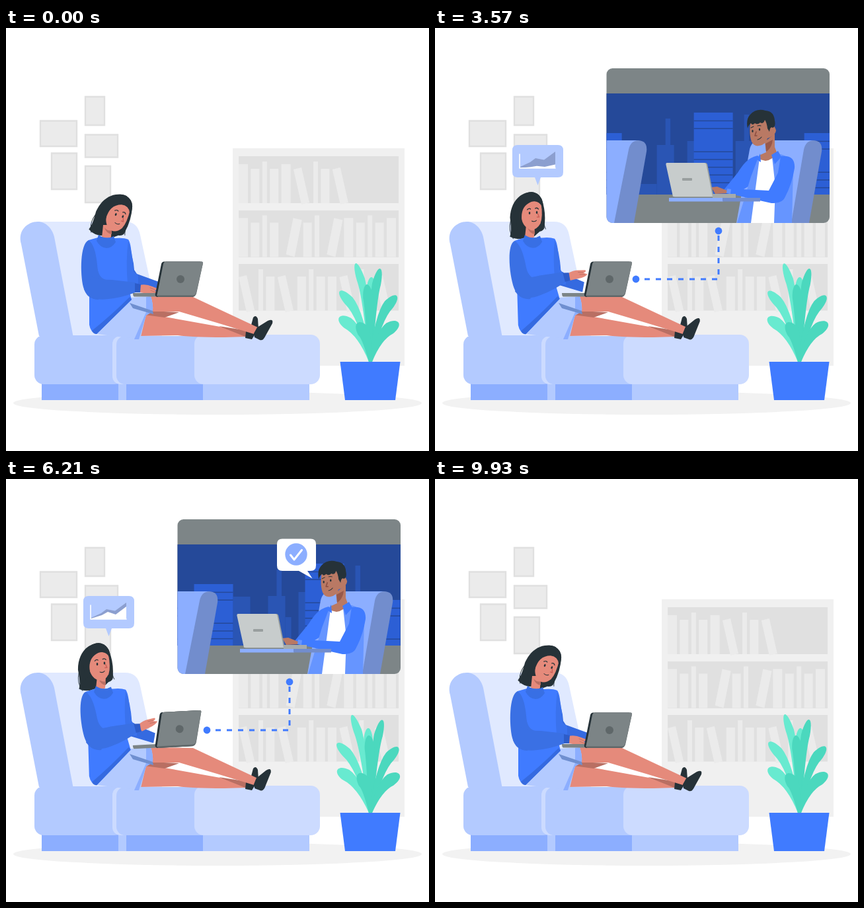
Write an HTML page that moves like this. It is 640 by 640 pixels and loops after 10000 ms.

```html
<!DOCTYPE html>
<html lang="en">
<head>
<meta charset="utf-8">
<title>Remote call</title>
<style>
html, body { margin: 0; width: 100%; height: 100%; overflow: hidden; background: #fff; }
svg { display: block; width: 100vw; height: 100vh; }
.line { fill: none; stroke-linecap: round; stroke-linejoin: round; }
</style>
</head>
<body>
<svg viewBox="0 0 640 640">
  <defs>
    <clipPath id="frame"><rect x="259.500" y="61" width="337.500" height="234" rx="9"/></clipPath>
    <clipPath id="window"><rect x="259" y="99" width="338" height="153"/></clipPath>
    <mask id="reveal" maskUnits="userSpaceOnUse" x="0" y="0" width="640" height="640">
      <path id="wipe" d="M304 380H429V307" pathLength="1" stroke-dasharray="1 2" fill="none" stroke="#fff" stroke-width="8"/>
    </mask>
  </defs>

  <!-- room -->
  <ellipse cx="320" cy="567.5" rx="309" ry="17.5" fill="#f2f2f2"/>
  <path d="M120 104h29v43h-29zM52 140.500h55v38.500h-55zM120 161.500h49v34h-49zM69 189.500h38v54.500h-38zM120 209h38v55h-38z" fill="#ebebeb" stroke="#e0e0e0" stroke-width="2.400"/>
  <path d="M343 182H603V511H343Z" fill="#f0f0f0"/>
  <path d="M352 194H594V265H352ZM352 276H594V347H352ZM352 357H594V427.500H352Z" fill="#e0e0e0"/>
  <g id="books" fill="#ebebeb"/>

  <!-- sofa -->
  <path d="M47 293H180Q199 293 203 313L236 466H95Z" fill="#e0e9ff"/>
  <path d="M50 466L23 327C17 306 33 293 48 293C60 293 70 303 73 316L101.500 466Z" fill="#b3caff"/>
  <path d="M54 535H170V563H54ZM182 535H298V563H182Z" fill="#8caeff"/>
  <path d="M170 535H182V563H170ZM298 535H459V563H298Z" fill="#b3caff"/>
  <rect x="43" y="465" width="135" height="74" rx="14" fill="#b3caff"/>
  <rect x="161" y="466" width="60" height="73" rx="12" fill="#ccdbff"/>
  <rect x="167" y="466" width="150" height="73" rx="13" fill="#b3caff"/>
  <rect x="285" y="464" width="190" height="75" rx="14" fill="#ccdbff"/>

  <!-- plant -->
  <g id="leafL" fill="#68ead0"/>
  <g id="leafD" fill="#4bd8be"/>
  <path d="M505.500 505H596.500L589 563H513Z" fill="#407bff"/>

  <!-- call link -->
  <path d="M304 380H429V307" fill="none" stroke="#407bff" stroke-width="3" stroke-dasharray="8 9" stroke-dashoffset="-13" mask="url(#reveal)"/>
  <circle id="dotA" cx="304" cy="380" r="5.400" fill="#407bff"/>
  <circle id="dotB" cx="429" cy="307" r="5.400" fill="#407bff"/>

  <!-- train scene -->
  <g id="panel"><g clip-path="url(#frame)">
    <path d="M259 61H597V295H259Z" fill="#7d8587"/>
    <path d="M259 99H597V252H259Z" fill="#254999"/>
    <g clip-path="url(#window)"><g id="city"/></g>
    <path d="M259 170H308L290 295H259Z" fill="#8caeff"/>
    <path d="M271 295L293 184Q296 170 308 170Q322 171 320 187L301 295Z" fill="#728dcd"/>
    <path d="M456 295L476 184Q479 170 492 170H572L556 295Z" fill="#8caeff"/>
    <path d="M539 295L558 184Q561 170 573 170Q587 171 585 187L566 295Z" fill="#728dcd"/>
    <path d="M488 193C472 197 466 207 458 219L436 246L452 253L482 235L494 198Z" fill="#407bff"/>
    <path d="M489 196L478 225L457 295H480L494 215ZM508 193L523 191Q544 197 542 213L540 295H511Z" fill="#6695ff"/>
    <path d="M491 197Q500 204 510 195L515 240L513 295H478L486 235Z" fill="#fff"/>
    <path d="M499 172L514 160L514 180L517 188Q511 200 500 201L492 199V192L501 188Z" fill="#b97964"/>
    <path d="M500 175L511 169Q510 181 501 187Z" fill="#97594b"/>
    <path d="M492 190L487 199L493 203ZM509 192L519 186L524 195L514 206Z" fill="#407bff"/>
    <path d="M523 194C538 192 545 198 544 212Q540 237 529 257Q525 265 509 265L442 250L447 243L505 246L519 219Z" fill="#407bff"/>
    <g id="manHead">
      <path d="M477 145Q475 162 479 172Q483 180 491 178Q501 176 503 167Q515 163 516 155Q514 147 510 148L507 138H480Z" fill="#b97964"/>
      <path d="M473 152Q470 138 477 131Q486 121 500 125Q513 126 514 140Q516 149 511 151Q507 148 506 157L503 152Q502 143 499 139Q497 146 492 143Q488 147 484 144Q480 148 478 144Q474 147 473 152Z" fill="#263238"/>
      <ellipse cx="480.500" cy="156" rx="1.200" ry="1.900" fill="#263238"/>
      <ellipse cx="491" cy="153.500" rx="1.200" ry="1.900" fill="#263238"/>
      <g class="line" stroke="#263238">
        <path d="M478 151l4-2M488 148q3-1 5 0M488 169q4-1 6-4"/>
        <path d="M486 157l-2 6h3" stroke="#8c4c40" stroke-width="1.500"/>
      </g>
    </g>
    <path d="M418 241L427 240L442 246V250L424 251Z" fill="#b97964"/>
    <path d="M442 243L448 244L447 251L441 250Z" fill="#6695ff"/>
    <path d="M352 204H409Q412 204 412.500 208L422 256H362Z" fill="#999f9f"/>
    <path d="M351 204H407Q410 204 410.500 207L420 255H360L349.500 207Q349 204 351 204Z" fill="#c7cccc"/>
    <rect x="374" y="227" width="15" height="4" rx="1" fill="#999f9f"/>
    <path d="M420 251H455V257H420Z" fill="#a6abab"/>
    <path d="M354 257H436V262.500H354Z" fill="#8caeff"/>
    <path d="M435 257H492V262.500H435Z" fill="#728dcd"/>
    <g id="reply">
      <path d="M418 90.500H461Q469 90.500 469 98.500V131Q469 139 461 139H456L463.500 150.500L443 139H418Q410 139 410 131V98.500Q410 90.500 418 90.500Z" fill="#fff"/>
      <circle cx="439" cy="114" r="16.700" fill="#8caeff"/>
      <path id="check" class="line" d="M430.500 115L436 122L447.500 107.500" pathLength="1" stroke-dasharray="1 2" stroke="#fff" stroke-width="3"/>
    </g>
  </g></g>

  <!-- woman -->
  <path d="M210 432L240 437L363 459L364 467L330 468Q280 468 260 465L202 466Z" fill="#e58a7b"/>
  <path d="M215 428L262 430L240 438L210 434ZM322 451L378 460L362 467Z" fill="#b96f63"/>
  <path d="M362 469L363 459L370 458Q371 447 374 438Q378 433 381 440L382 455L372 471Z" fill="#263238"/>
  <path d="M218 406L283 407L349 438L381 453L375 463Q320 446 262 429L222 429Z" fill="#e58a7b"/>
  <path id="shoe" d="M375 462L380 453L396 443Q405 439 403 447L393 465Q389 474 384 472L376 468Z" fill="#263238"/>
  <path d="M188 408L219 406Q223 418 222 428L212 434L203 471L137 463Z" fill="#b3caff"/>
  <path d="M212 407L219 406Q223 418 222 429L212 435L201 471H194L212 430Z" fill="#8caeff"/>
  <path d="M187 416L192 424L223 433L222 428Z" fill="#6f8fd0"/>

  <path class="head" d="M146 248C126 249 114 265 113 287Q116 308 113 316Q124 322 137 317H148L158 308Q167 306 165 297L163 268Q161 250 146 248Z" fill="#263238"/>
  <g id="neck">
    <path d="M138 298L151 298L150 316Q145 323 136 317Z" fill="#e58a7b"/>
    <path d="M140 302Q145 308 151 306V312Q143 311 140 302Z" fill="#b96f63"/>
  </g>
  <g id="body">
    <path id="farArm" d="M183 330Q193 345 194 366L198 372L231 384L229 399L190 389Q178 382 183 330Z" fill="#356ae0"/>
    <path d="M139 317L125 321Q116 340 126 400L126 449Q128 461 137 463L190 411L184 388L184 345L190 345Q189 325 185 320Q178 317 166 318Z" fill="#407bff"/>
    <path d="M185 322Q192 340 193 369L200 374V390L184 388Q181 350 185 322Z" fill="#3a72ed"/>
    <path d="M190 411L187 407Q160 434 130 458Q132 463 137 463Z" fill="#356ae0"/>
    <path d="M140 313Q152 321 163 315L166 324Q160 333 152 333Q142 332 137 322Z" fill="#386fe4"/>
    <g id="arm">
      <path d="M125 321C112 326 112 372 117 392Q122 411 140 411L152 381Q139 379 138 358Q135 328 125 321Z" fill="#3a70e4"/>
      <g id="forearm">
        <g id="hand">
          <path d="M202 389Q212 387 221 391L229 394Q231 397 225 397L230 401Q225 404 215 402L202 400Z" fill="#e58a7b"/>
          <path class="line" d="M218 393L225 396M219 397L226 400" stroke="#b96f63" stroke-width=".8"/>
        </g>
        <path d="M130 376Q140 381 160 381L196 385V400Q175 408 155 410Q126 414 118 395Z" fill="#3a70e4"/>
        <path d="M195 386L204 388L203 400L195 400Z" fill="#2d5cc9"/>
      </g>
    </g>
  </g>
  <g class="head">
    <path d="M131 268Q146 256 160 266Q163 285 159 296Q153 306 145 305Q133 302 130 287Z" fill="#e58a7b"/>
    <path d="M131 292Q128 270 145 263Q156 260 161 270L165 300Q168 280 161 259Q153 248 142 250Q124 254 121 275L124 305Z" fill="#263238"/>
    <g class="line" stroke="#263238">
      <path d="M131 254Q143 244 155 252Q160 256 161 262M114 292Q110 307 118 319M163 285Q164 298 167 304" stroke-width=".9"/>
      <path d="M139 275q3-3 5-1M151 273q3-2 5 1" stroke-width="1.200"/>
      <path d="M146 292q4 2 7-1"/>
      <path d="M155 281l2 5h-3" stroke="#ca5f57" stroke-width="1.400"/>
    </g>
    <ellipse cx="142.500" cy="280" rx="1.300" ry="2.100" fill="#263238"/>
    <ellipse cx="153.500" cy="279" rx="1.300" ry="2.100" fill="#263238"/>
  </g>

  <g id="laptop">
    <path d="M192 401H229V406.500H194Q192 406 192 401Z" fill="#7c8486"/>
    <path d="M239 353.500H294L283 407H229Q225 406 226 402L235 357Q236 353.500 239 353.500Z" fill="#263238"/>
    <path d="M242 353.500H296Q298.500 353.500 298 356L288 402Q286 407 282 407H230L228 405Z" fill="#5f6769"/>
    <path d="M242 353.500H296Q298.500 353.500 298 356L288 400Q287 404.500 282 404.500H228.500L238 357Q239 353.500 242 353.500Z" fill="#7c8486"/>
    <circle cx="264" cy="380" r="6" fill="#5f6769"/>
  </g>

  <!-- chart bubble -->
  <g id="note">
    <path d="M125 177H186Q194 177 194 185V218Q194 226 186 226H160L155.500 238L151 226H125Q117 226 117 218V185Q117 177 125 177Z" fill="#b3caff"/>
    <path id="areaA" d="M129 212V210L144 203L152 197L165 199.500L182 187V212Z" fill="#8c9fcf"/>
    <path id="areaB" d="M129 212V211L145 206L154 201L166 205L182 193V212Z" fill="#fff"/>
    <path class="line" d="M128 191V212H182" stroke="#fff" stroke-width="1.600"/>
  </g>
</svg>

<script>
const LOOP = 10000, STEP = LOOP / 140, TILE = 335;
const $ = id => document.getElementById(id);

function add(id, tag, attrs) {
  const el = document.createElementNS('http://www.w3.org/2000/svg', tag);
  for (const k in attrs) el.setAttribute(k, attrs[k]);
  $(id).append(el);
}
const path = (id, d) => add(id, 'path', { d });
const box = (x, y, width, height, fill) => add('city', 'rect', { x, y, width, height, fill });

// Shelves as text: a, b, c are upright books, slashes lean, a space is a gap.
const upright = { a: [14, 59], b: [13, 52], c: [7, 63] };
['abcba\\cb\\', 'abcb/bc/abcba', '\\cb\\bcbb\\c \\'].forEach((row, i) => {
  const floor = 265 + i * 81.5;
  let x = 352;
  for (const ch of row) {
    if (upright[ch]) {
      const [w, h] = upright[ch];
      path('books', `M${x} ${floor}v${-h}h${w}v${h}Z`);
      x += w + 4.4;
    } else if (ch === '\\') {
      path('books', `M${x} ${floor - 51}l12 -3l12 53l-12 3Z`);
      x += 30;
    } else if (ch === '/') {
      path('books', `M${x + 7} ${floor - 4}l11 -55l13 3l-11 56Z`);
      x += 33;
    } else x += 12;
  }
});

// A leaf bends outwards from the pot; shorter leaves are broader.
function leaf(id, tx, ty) {
  const size = Math.hypot(tx, ty), w = 12.5 - size / 24, cx = tx * .3, cy = ty * .68;
  const len = Math.hypot(tx - cx, ty - cy), ux = (tx - cx) / len, uy = (ty - cy) / len;
  const round = Math.max(1.7 * w, size * .17);
  const at = (x, y, along, side) => `${551 + x + ux * along - uy * side} ${505 + y + uy * along + ux * side} `;
  path(id, `M549 505Q${at(cx, cy, 0, -w * .8)}${at(tx, ty, -round, -w)}C${at(tx, ty, round * .33, -w * .8)}` +
    `${at(tx, ty, round * .33, w * .8)}${at(tx, ty, -round, w)}Q${at(cx, cy, 0, w * .8)}554 505Z`);
}
for (const [x, y] of [[-22, -149], [-46, -107], [-47, -67], [2, -128]]) leaf('leafL', x, y);
for (const [x, y] of [[15, -141], [-5, -117], [40, -100], [43, -59], [-19, -59]]) leaf('leafD', x, y);

// Skyline
const block = (x, top, w) => box(x, top, w, 252 - top, '#2a55b4');
function spire(x, top) {
  block(x + 13, top, 7.5);
  block(x, top + 40, 26);
}
function tower(x, top) {
  box(x, top, 59, 252 - top, '#2c5fd5');
  for (let i = 1; top + i * 11.7 < 252; i++)
    if (i !== 3 && i !== 4) box(x, top + i * 11.7, 59, 1.5, '#254999');
}
for (let x = 260 - TILE; x < 600; x += TILE) {
  block(x + 59, 178, 26);
  block(x + 85, 236, 27);
  block(x + 138, 209, 9);
  block(x + 158, 171, 27);
  block(x + 319, 180, 9);
  spire(x + 112, 137);
  spire(x + 231, 131);
  tower(x, 159);
  tower(x + 168, 128);
  tower(x + 253, 183);
}

const ramp = (t, a, b) => {
  const u = Math.min(1, Math.max(0, (t - a) / (b - a)));
  return u * u * (3 - 2 * u);
};
// Rises from a to b, falls from c to d.
const pulse = (t, a, b, c, d) => ramp(t, a, b) - ramp(t, c, d);

const put = (id, tr) => $(id).setAttribute('transform', tr);
const spin = (id, a, x, y) => put(id, `rotate(${a} ${x} ${y})`);
const zoom = (id, s, x, y, sx = s) => put(id, `translate(${x} ${y}) scale(${sx} ${s}) translate(${-x} ${-y})`);
const trace = (id, u) => {
  $(id).setAttribute('stroke-dashoffset', 1 - u);
  $(id).style.opacity = u > 0 ? 1 : 0;
};
const heads = document.querySelectorAll('.head');

function draw(t) {
  // link and call window
  trace('wipe', pulse(t, 150, 650, 8480, 9000));
  zoom('dotA', pulse(t, 70, 250, 8900, 9080), 304, 380);
  zoom('dotB', pulse(t, 560, 720, 8400, 8560), 429, 307);
  zoom('panel', pulse(t, 640, 1180, 7850, 8430), 429, 307);
  put('city', `translate(${(.4033 * t - 136.7 + TILE) % TILE} 0)`);
  spin('manHead', .5 * Math.sin(t * Math.PI / 715), 505, 185);
  zoom('reply', ramp(t, 4640, 5140), 463, 150);
  trace('check', ramp(t, 5360, 5860));

  // chart bubble
  zoom('note', pulse(t, 1880, 2320, 7000, 7500), 155, 237);
  zoom('areaA', ramp(t, 2350, 3200), 155, 212, 1);
  zoom('areaB', ramp(t, 3250, 4150), 155, 212, 1);

  // woman
  const up = pulse(t, 400, 1500, 7500, 8560);
  const nod = pulse(t, 3000, 4430, 4500, 5600) - 3 * pulse(t, 4500, 5600, 7500, 8500);
  const late = pulse(t, 4700, 5800, 7500, 8900);
  const lift = pulse(t, 900, 1900, 3570, 4200) + late;
  const reach = .6 * pulse(t, 2600, 3300, 3600, 4200) + late;
  const tilt = `translate(${13 * (1 - up) + nod} ${1 - up}) rotate(${22 * (1 - up) + nod} 145 308)`;
  heads.forEach(el => el.setAttribute('transform', tilt));
  put('neck', `translate(${9 * (1 - up)} 0)`);
  spin('body', -1.7 * up, 145, 455);
  spin('farArm', 4 * up, 186, 340);
  spin('arm', -4 * lift, 128, 330);
  spin('forearm', -9 * lift, 134, 396);
  spin('hand', 11 * lift - 31 * reach, 203, 394);
  spin('laptop', -3 * pulse(t, 4200, 5600, 7500, 8900), 228, 405);
  spin('shoe', -7 * pulse(t, 200, 2140, 7500, 9930), 378, 464);

  // plant
  const sway = pulse(t, 0, 2140, 2140, 4200) + pulse(t, 4200, 6210, 6210, 8200);
  spin('leafL', -2.2 * sway, 551, 505);
  spin('leafD', 1.4 * sway, 551, 505);
}

const start = performance.now();
function play() {
  const t = (performance.now() - start) % LOOP;
  draw(Math.floor((t + 5) / STEP) % 140 * STEP);
  requestAnimationFrame(play);
}
play();
</script>
</body>
</html>
```
